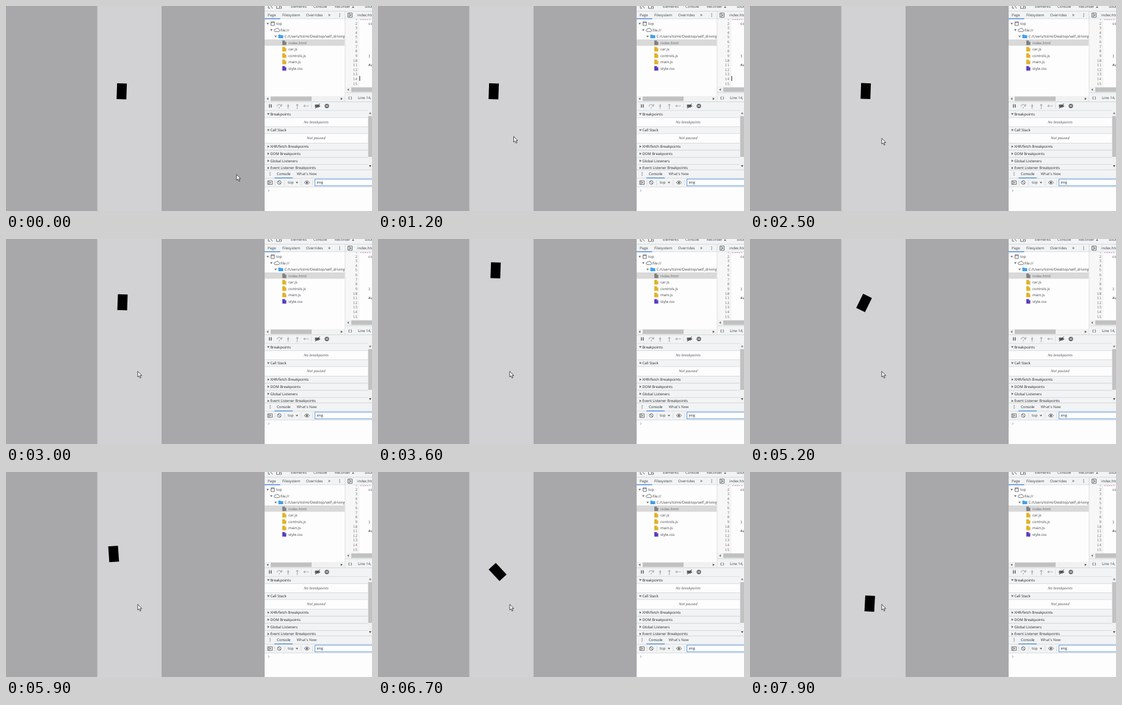
An HTML page that plays this animation: 600x337 px, repeating every 8 s.

```html
<!DOCTYPE html>
<html lang="en">
<head>
<meta charset="utf-8">
<title>Driving a car on a road</title>
<style>
  html, body { margin: 0; width: 100%; height: 100%; overflow: hidden; }
  svg { display: block; width: 600px; height: 337px; }
  text { font: 6px "Open Sans", sans-serif; fill: #3c4043; white-space: pre; text-rendering: geometricPrecision; }
  .mono { font: 6px "Noto Sans Mono", monospace; }
  .italic { font-style: italic; fill: #55585c; text-anchor: middle; }
  .line { fill: none; stroke: #6e7175; stroke-width: 1; }
  .faint { stroke: #9a9da1; }
</style>
</head>
<body>
<svg viewBox="0 0 600 337">
  <defs>
    <clipPath id="tree"><path d="M424 21h131v127H424z"/></clipPath>
    <clipPath id="code"><path d="M557 22h43v111h-43z"/></clipPath>
    <clipPath id="sections"><path d="M424 171h169v98H424z"/></clipPath>
  </defs>
  <rect width="600" height="337" fill="#a8a7a9"/>
  <rect x="149.7" width="105.3" height="337" fill="#d2d1d3"/>
  <g id="panel"></g>
  <rect id="caret" x="579.4" y="115" width="1" height="8" fill="#222"/>
  <rect id="car" x="-8" y="-13" width="16" height="26"/>
  <path id="mouse" d="M0 0v9.4l2.1-1.9 1.7 3.6 1.5-.7-1.6-3.5h2.9z" fill="#fff" stroke="#222" stroke-width=".8"/>
</svg>
<script>
const $ = id => document.getElementById(id);
const parts = [];
const add = s => parts.push(s);
const rect = (x, y, w, h, fill, extra = '') =>
  add(`<rect x="${x}" y="${y}" width="${w}" height="${h}" fill="${fill}" ${extra}/>`);
const text = (x, y, s, attrs = '') => add(`<text x="${x}" y="${y}" ${attrs}>${s}</text>`);
const fill = (d, color = '#6e7175') => add(`<path d="${d}" fill="${color}"/>`);
const line = (d, attrs = '', cls = '') => add(`<path class="line ${cls}" d="${d}" ${attrs}/>`);
const dots = (x, y) => [-2.3, 0, 2.3].forEach(k => rect(x - .6, y + k - .6, 1.2, 1.2, '#5f6368'));
const down = (x, y, color) => fill(`M${x - 2} ${y - 1.2}h4l-2 3z`, color);
const right = (x, y, color) => fill(`M${x - 1.2} ${y - 2}v4l3-2z`, color);
const left = (x, y) => fill(`M${x + 1.2} ${y - 2}v4l-3-2z`);
const group = (clip, draw) => { add(`<g clip-path="url(#${clip})">`); draw(); add('</g>'); };

const BAR = '#f1f3f4', EDGE = '#cfd1d4', BLUE = '#3b82dd', THUMB = '#c1c1c1';

function drawTabs() {
  rect(424, 0, 176, 337, '#fefdfe');
  rect(424, 0, 176, 21, BAR);
  rect(424, 8, 176, .8, EDGE);
  line('M430 0v3.5h3M434 0l3 4');
  line('M443.5 0v4h5V0M449.5 1h2v3h-2');
  [[467, 'Elements'], [504, 'Console'], [539, 'Recorder'], [588, 'Sources']].forEach(([x, s]) => text(x, 3.4, s));
  fill('M567 3l2-3 2 3z');
  [[429, 'Page'], [453, 'Filesystem'], [492, 'Overrides']].forEach(([x, s]) => text(x, 17.2, s));
  text(528, 17.2, '»', 'style="font-size:8px"');
  dots(547, 15);
  rect(424, 20.6, 176, .7, EDGE);
  rect(424, 20.3, 25.5, 1.3, BLUE);
  line('M560.5 11.5h7v7h-7zM562.8 11.5v7');
  fill('M564 13l2.5 2-2.5 2z');
  text(576, 17.2, 'index.html');
}

function drawTree() {
  const row = i => 29 + i * 10.5;
  group('tree', () => {
    rect(424, 55, 131, 10.4, '#d9d9d9');
    down(429, row(0)); down(435, row(1)); down(442, row(2));
    line('M434.5 26h5.5v6h-5.5zM434.5 27.2h5.5');
    text(443, row(0) + 2.2, 'top');
    line('M441 42h6.2a1.8 1.8 0 0 0 0-3.5a2.5 2.5 0 0 0-4.7-.5a2 2 0 0 0-1.5 4z', 'stroke-width=".9"');
    text(450, row(1) + 2.2, 'file://');
    fill('M446.5 47h3l1 1h4v5h-8z', '#41a0ee');
    text(456.5, row(2) + 2.2, 'C:/Users/tolmi/Desktop/self_driving_car');
    [['index.html', '#808080'], ['car.js', '#e0b22c'], ['controls.js', '#e0b22c'],
     ['main.js', '#e0b22c'], ['style.css', '#5b3fc0']].forEach(([name, color], i) => {
      const y = row(i + 3);
      fill(`M453 ${y - 3.7}h4.2l2.3 2.3v5.2h-6.5z`, color);
      fill(`M457.2 ${y - 3.7}v2.3h2.3z`, '#ffffffa0');
      text(463, y + 2.2, name, i ? '' : 'style="fill:#63666a"');
    });
  });
  rect(424, 148, 131.5, 9, '#f1f1f1');
  rect(434, 148.8, 67, 7.4, THUMB);
  left(429, 152.5); right(550, 152.5, '#555');
  rect(555.5, 9, .8, 148, EDGE);
}

function drawEditor() {
  const baseline = n => 30.6 + (n - 2) * 7.62;
  group('code', () => {
    rect(557, 21, 21.5, 112, '#f7f7f7');
    rect(578, 21, .6, 112, '#e4e4e4');
    for (let n = 1; n <= 15; n++)
      text(576, baseline(n), n, 'class="mono" text-anchor="end" style="fill:#777"');
    text(580, baseline(1), 'class', 'class="mono" style="fill:#a0307f"');
    [[2, 'color'], [9, '}'], [11, '#app']].forEach(([n, s]) =>
      text(594, baseline(n), s, 'class="mono"'));
  });
  rect(556.3, 133, 44, 9, '#f1f1f1');
  rect(566, 133.8, 34, 7.4, THUMB);
  left(561, 137.5);
  rect(556.3, 142, 44, 15, BAR);
  rect(556.3, 142, 44, .7, EDGE);
  text(561, 152.5, '{ }', 'style="font-weight:600"');
  text(577, 152.7, 'Line 14, Column 1');
}

function drawDebugger() {
  rect(424, 157, 176, 15, BAR);
  rect(424, 157, 176, .8, EDGE);
  rect(431, 161.5, 1.5, 5.5, '#5f6368'); rect(434, 161.5, 1.5, 5.5, '#5f6368');
  ['M444 165a4 4 0 0 1 7.5-1M452 161v3.5h-3', 'M462.5 161v4.5M460.5 163.5l2 2 2-2',
   'M477.5 167v-5M475.5 163.5l2-2 2 2', 'M488 164.2h5M490 162.2l-2 2 2 2'].forEach(d => line(d, '', 'faint'));
  [[448, 167.3], [462.5, 167.5], [477.5, 168.3], [495, 164.2]].forEach(([x, y]) =>
    add(`<circle cx="${x}" cy="${y}" r=".9" fill="#9a9da1"/>`));
  rect(500.5, 160, .7, 9, EDGE);
  fill('M506.5 162h6l3 2.4-3 2.4h-6z', '#5f6368');
  line('M507 168.5l7.5-8', 'style="stroke:#333"');
  add('<circle cx="526" cy="164.3" r="3.6" fill="#5f6368"/>');
  rect(524.5, 162.7, 1, 3.2, '#fff'); rect(526.7, 162.7, 1, 3.2, '#fff');

  group('sections', () => {
    [[171.5, 'Breakpoints', 1], [198, 'Call Stack', 1], [225, 'XHR/fetch Breakpoints'],
     [236.8, 'DOM Breakpoints'], [248.6, 'Global Listeners'], [260.2, 'Event Listener Breakpoints']
    ].forEach(([y, name, open]) => {
      rect(424, y, 169, 11.8, BAR);
      rect(424, y, 169, .7, EDGE);
      rect(424, y + 11.5, 169, .7, EDGE);
      (open ? down : right)(430, y + 6, '#5f6368');
      text(433.2, y + 8.2, name, 'style="fill:#222"');
    });
    text(508.5, 193, 'No breakpoints', 'class="italic"');
    text(508.5, 219.4, 'Not paused', 'class="italic"');
  });
  rect(593, 172, 7, 97, '#f1f1f1');
  rect(593.8, 181, 6.2, 67, THUMB);
  fill('M595 177.5h4l-2-3z', '#777');
  down(597, 263, '#444');
}

function drawConsole() {
  rect(424, 269, 176, 28.5, BAR);
  rect(424, 269, 176, .8, EDGE);
  dots(433, 276);
  text(444, 278.2, 'Console', 'style="fill:#222"');
  text(476.5, 278.2, "What's New");
  rect(424, 282.7, 176, .7, EDGE);
  rect(440, 282, 30, 1.2, BLUE);
  line('M429 287.3h7.5v6H429zM431 287.3v6');
  fill('M432.5 288.6l2.5 1.7-2.5 1.7z');
  rect(440.5, 286, .7, 9, EDGE);
  add('<circle class="line" cx="448" cy="290.2" r="3"/>');
  line('M446 288.1l4 4.2');
  rect(456.5, 286, .7, 9, EDGE);
  text(462, 292.2, 'top');
  down(477, 290.1);
  rect(483.5, 286, .7, 9, EDGE);
  line('M489 290.2q4.3-5.4 8.6 0q-4.3 5.4-8.6 0z', 'stroke-width=".9"');
  add('<circle cx="493.3" cy="290.2" r="1.6" fill="#5f6368"/>');
  rect(502, 286, .7, 9, EDGE);
  rect(506.5, 284.7, 100, 11, '#fff', `stroke="${BLUE}" stroke-width=".8"`);
  text(509.5, 292.2, 'img', 'style="fill:#222"');
  rect(424, 297.3, 176, .7, EDGE);
  line('M429.8 301.7l1.9 1.8-1.9 1.8', 'style="stroke:#8a9bb8" stroke-width=".9"');
}

[drawTabs, drawTree, drawEditor, drawDebugger, drawConsole].forEach(draw => draw());
$('panel').innerHTML = parts.join('');

// Linear interpolation over keys of [time, ...values].
function at(keys, t) {
  if (t <= keys[0][0]) return keys[0].slice(1);
  const i = keys.findIndex(k => k[0] > t);
  if (i < 0) return keys[keys.length - 1].slice(1);
  const a = keys[i - 1], b = keys[i], f = (t - a[0]) / (b[0] - a[0]);
  return a.slice(1).map((v, j) => v + (b[j + 1] - v) * f);
}

// Speed in px/ms (negative is reverse) and heading in degrees.
const SPEED = [[2443, 0], [2776, .093], [3440, .093], [3800, 0], [3980, -.0455]];
const HEADING = [[4870, 2], [5110, 26], [5600, 26], [6290, -43], [6700, -43], [7260, 13], [7800, 13], [7900, 3]];
const MOUSE = [[0, 378, 277], [100, 379, 282], [200, 376, 270], [400, 350, 150], [600, 320, 66],
  [800, 286, 100], [900, 277.5, 140], [1000, 246, 184], [1100, 230, 205], [1200, 222.5, 214.5],
  [1300, 218, 216], [1400, 215.5, 216], [1700, 215.5, 216], [1900, 216, 217.5]];

const STEP = 100, LOOP = 8000;
const poses = [];
let x = 189.7, y = 140.3;
for (let t = 0; t < LOOP; t += 10) {
  const [a] = at(HEADING, t);
  if (t % STEP === 0) poses.push([x, y, a]);
  const [v] = at(SPEED, t + 5), r = at(HEADING, t + 5)[0] * Math.PI / 180;
  x += v * 10 * Math.sin(r);
  y -= v * 10 * Math.cos(r);
}

function frame(now) {
  const n = Math.floor(now % LOOP / STEP), t = n * STEP;
  const [cx, cy, a] = poses[n];
  $('car').setAttribute('transform', `translate(${cx} ${cy}) rotate(${a})`);
  $('mouse').setAttribute('transform', `translate(${at(MOUSE, t).join(' ')})`);
  $('caret').style.display = t < 600 || (t >= 1100 && t < 1600) ? '' : 'none';
  requestAnimationFrame(frame);
}
frame(0);
</script>
</body>
</html>
```
